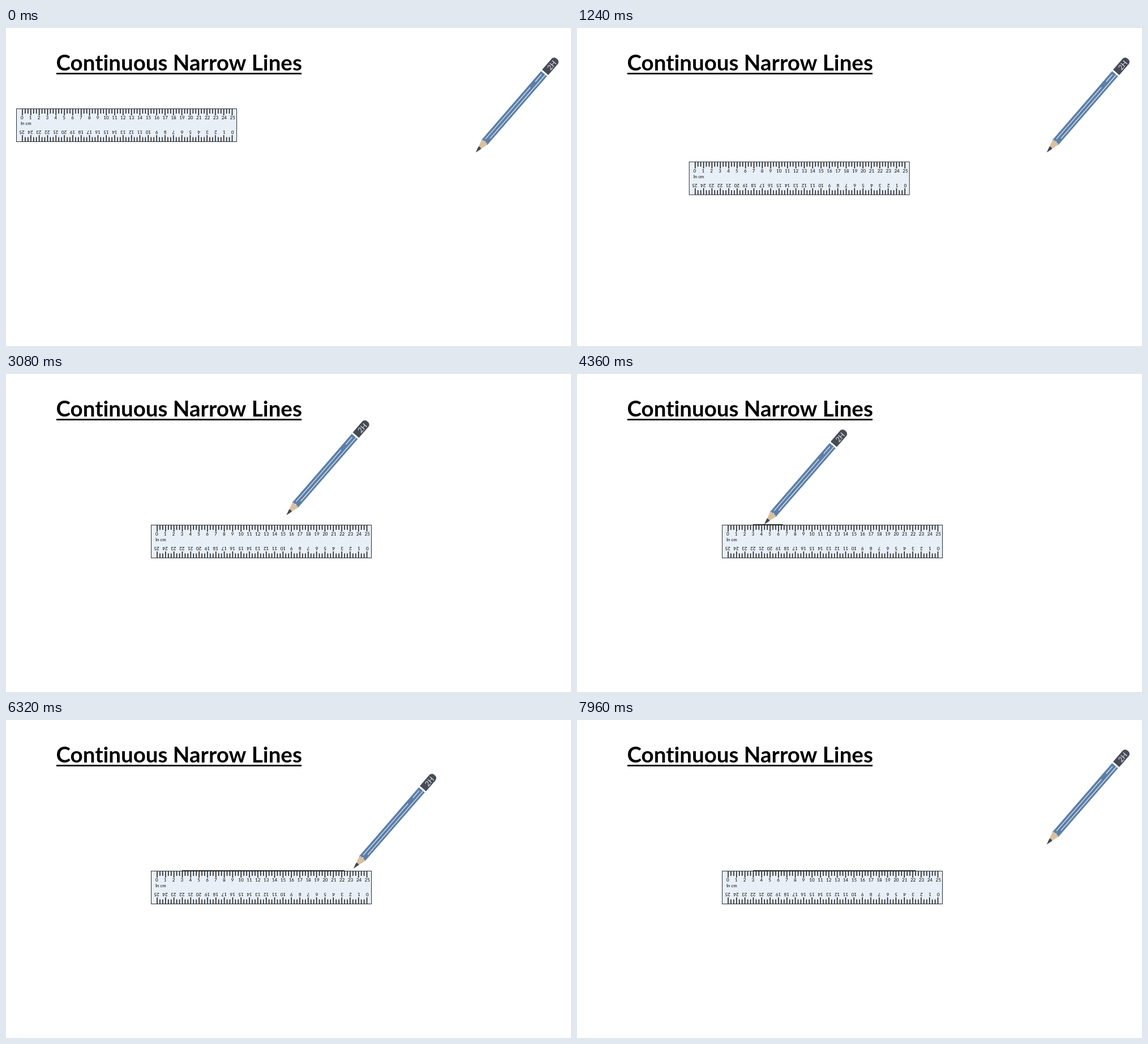
An HTML page with a canvas for the animation above (8 s loop, 998x561 px).

```html
<!DOCTYPE html>
<html lang="en">
<head>
<meta charset="utf-8">
<title>Continuous Narrow Lines</title>
<style>
html, body { margin: 0; width: 100%; height: 100%; overflow: hidden; background: #fff; }
canvas { display: block; width: 998px; height: 561px; }
</style>
</head>
<body>
<canvas id="stage"></canvas>
<script>
const W = 998, H = 561, LOOP = 8000, STEP = 40;
const FONT = 'Lato, Carlito, "Open Sans", sans-serif';
const canvas = document.getElementById('stage');
const ctx = canvas.getContext('2d');
const dpr = window.devicePixelRatio || 1;
canvas.width = Math.round(W * dpr);
canvas.height = Math.round(H * dpr);

const MOVE = 1735;
const START = { ruler: 112, approach: 2076, stroke: 4040, leave: 6002 };
const RULER = { x: 18.5, y: 142.5, dx: 238, dy: 124 };
const REST = [829.5, 219.2], LINE_FROM = [311, 265], LINE_TO = [598, 265];

const progress = (t, start) => Math.min(1, Math.max(0, (t - start) / MOVE));
// Constant acceleration to the midpoint, then constant braking
const ease = p => p < 0.5 ? 2 * p * p : 1 - 2 * (1 - p) * (1 - p);
const mix = (a, b, k) => a + (b - a) * k;
const between = (a, b, k) => [mix(a[0], b[0], k), mix(a[1], b[1], k)];

function text(str, x, y, size, { weight = 400, align = 'center', color = '#000' } = {}) {
  ctx.font = `${weight} ${size}px ${FONT}`;
  ctx.letterSpacing = '0.01px'; // any spacing switches ligatures off
  ctx.textAlign = align;
  ctx.fillStyle = color;
  ctx.fillText(str, x, y);
}

function segment(x1, y1, x2, y2, width, color) {
  ctx.strokeStyle = color;
  ctx.lineWidth = width;
  ctx.beginPath();
  ctx.moveTo(x1, y1);
  ctx.lineTo(x2, y2);
  ctx.stroke();
}

function polygon(points, color) {
  ctx.fillStyle = color;
  ctx.beginPath();
  points.forEach(([x, y]) => ctx.lineTo(x, y));
  ctx.fill();
}

function drawTitle() {
  text('Continuous Narrow Lines', 88.5, 75, 38.5, { weight: 700, align: 'left' });
  ctx.fillRect(89, 79, 433, 2.8);
}

function drawRuler(x, y) {
  const w = 389, h = 58;
  ctx.save();
  ctx.translate(x, y);
  ctx.fillStyle = '#e8eff7';
  ctx.fillRect(0, 0, w, h);
  for (let i = 0; i <= 75; i++) {
    const tx = 10.5 + i * 370.5 / 75, major = i % 3 === 0;
    segment(tx, 0, tx, major ? 11.5 : 8.5, 1.5, '#111');
    segment(tx, h, tx, h - (major ? 11.5 : 8), 1.5, '#111');
  }
  for (let cm = 0; cm <= 25; cm++) {
    const tx = 9.7 + cm * 14.88;
    text(cm, tx, 18.7, 8);
    ctx.save();
    ctx.translate(tx, 38.8);
    ctx.rotate(Math.PI);
    text(25 - cm, 0, 0, 8);
    ctx.restore();
  }
  text('In cm', 7.4, 28.6, 7.8, { align: 'left' });
  ctx.strokeStyle = '#2b2f36';
  ctx.lineWidth = 1;
  ctx.strokeRect(0, 0, w, h);
  ctx.restore();
}

// Drawn along the x axis with the point at the origin
function drawPencil([x, y]) {
  const stripe = '#e6ebf1';
  ctx.save();
  ctx.translate(x, y);
  ctx.rotate(-49 * Math.PI / 180);
  ctx.translate(0, 0.3);
  polygon([[0, 0], [25, -7], [25, 7]], '#d9c0a2');
  polygon([[0, 0], [11, -3.1], [12, 0], [11, 3.1]], '#42454f');

  ctx.fillStyle = '#5c7fa8';
  ctx.beginPath();
  ctx.moveTo(22.5, -6.8);
  ctx.quadraticCurveTo(27, -4.5, 24, -2.3);
  ctx.quadraticCurveTo(28, 0, 24, 2.3);
  ctx.quadraticCurveTo(27, 4.5, 22.5, 6.8);
  ctx.lineTo(184, 7);
  ctx.lineTo(184, -7);
  ctx.fill();

  segment(29, -2.5, 150, -2.5, 1.2, stripe);
  segment(163, -2.5, 180, -2.5, 1.2, stripe);
  segment(35, 3, 184, 3, 1.2, stripe);

  ctx.fillStyle = '#474b55';
  ctx.beginPath();
  ctx.roundRect(187, -7.2, 31.5, 14.4, [0, 6, 6, 0]);
  ctx.fill();
  text('2H', 204, 5, 12.8, { color: '#e3e6ea' });
  ctx.restore();
}

function pencilPoint(t) {
  if (t < START.stroke) return between(REST, LINE_FROM, ease(progress(t, START.approach)));
  if (t < START.leave) return between(LINE_FROM, LINE_TO, ease(progress(t, START.stroke)));
  return between(LINE_TO, REST, ease(progress(t, START.leave)));
}

function render(t) {
  ctx.setTransform(dpr, 0, 0, dpr, 0, 0);
  ctx.fillStyle = '#fff';
  ctx.fillRect(0, 0, W, H);
  drawTitle();
  const k = ease(progress(t, START.ruler));
  drawRuler(RULER.x + RULER.dx * k, RULER.y + RULER.dy * k);
  // The line is revealed at a steady rate
  const drawn = progress(t, START.stroke);
  if (drawn > 0) segment(LINE_FROM[0], 266, mix(LINE_FROM[0], LINE_TO[0], drawn), 266, 1.6, '#000');
  drawPencil(pencilPoint(t));
}

const began = performance.now();
function tick() {
  // 25 pictures a second, with a little slack for early callbacks
  const elapsed = performance.now() - began + STEP / 4;
  render(Math.floor(elapsed / STEP) * STEP % LOOP);
  requestAnimationFrame(tick);
}
tick();
</script>
</body>
</html>
```
